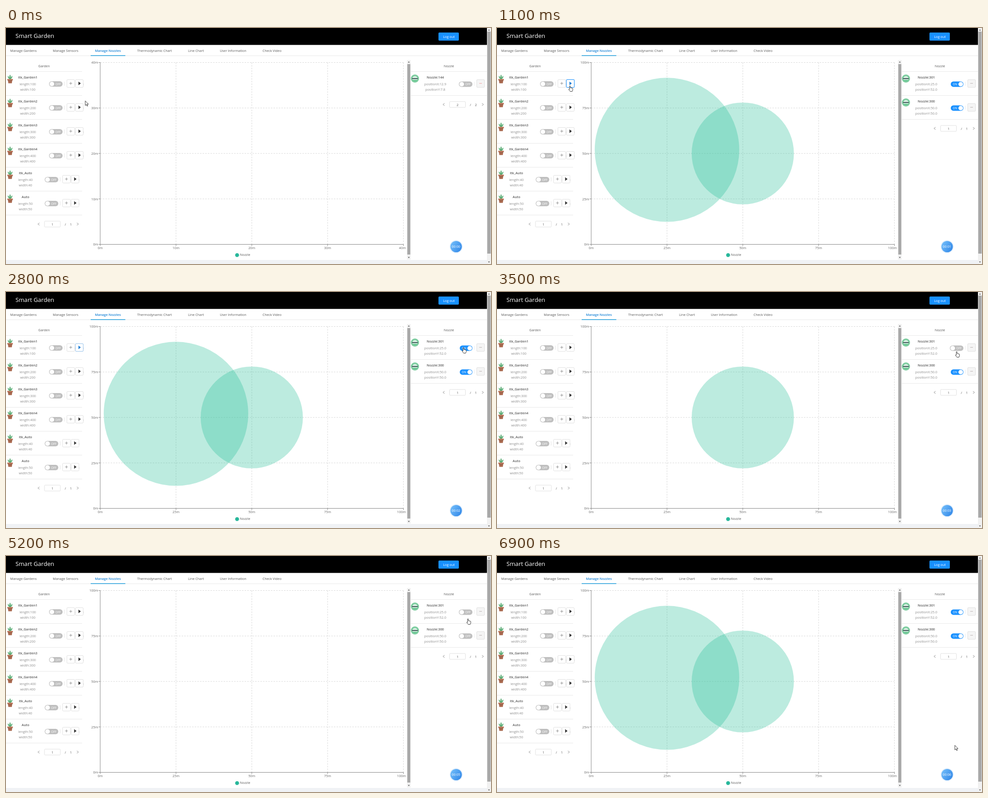
Animation of 1071 by 523 pixels, one loop 7 s. Source, as an HTML page:

```html
<!DOCTYPE html>
<html lang="en">
<head>
<meta charset="utf-8">
<title>Smart Garden</title>
<style>
html, body { margin: 0; width: 100%; height: 100%; overflow: hidden; background: #fff; }
svg { display: block; width: 1071px; height: 523px; font: 7.35px "Open Sans", "Noto Sans", sans-serif; }
</style>
</head>
<body>
<svg id="stage" viewBox="0 0 1071 523" xmlns="http://www.w3.org/2000/svg">
  <defs>
    <linearGradient id="blue" x1="0" y1="0.2" x2="1" y2="0.8">
      <stop offset="0" stop-color="#72bdfa"/><stop offset="1" stop-color="#3288e8"/>
    </linearGradient>
  </defs>
  <g id="page"></g>
  <g id="live"></g>
</svg>
<script>
const LOOP = 7000, STEP = 100;
const LOADED = 700;
const GREEN = '#23bc94', BLUE = '#1890ff', LINE = '#e8e8e8', EDGE = '#d9d9d9';
const page = document.getElementById('page');
const live = document.getElementById('live');

const clamp = v => Math.max(0, Math.min(1, v));
const lerp = (a, b, k) => a + (b - a) * k;
const ramp = (t, start, span) => clamp((t - start) / span);

const rect = (x, y, w, h, fill, more = '') =>
  `<rect x="${x}" y="${y}" width="${w}" height="${h}" fill="${fill}" ${more}/>`;
const disc = (x, y, r, fill, more = '') =>
  `<circle cx="${x}" cy="${y}" r="${r}" fill="${fill}" ${more}/>`;
const path = (d, more) => `<path d="${d}" ${more}/>`;
const stroke = (d, color, w = 1, more = '') =>
  path(d, `fill="none" stroke="${color}" stroke-width="${w}" ${more}`);
const text = (s, x, y, fill = '#595959', anchor = 'middle', more = '') =>
  `<text x="${x}" y="${y}" fill="${fill}" text-anchor="${anchor}" ${more}>${s}</text>`;
const BOLD = 'font-weight="600"';

function box(x, y, w, h, fill = '#fff', edge = EDGE) {
  return rect(x + .5, y + .5, w - 1, h - 1, fill, `rx="1.5" stroke="${edge}" stroke-width=".8"`);
}

// k = 0 is off, 1 is on; the right edge stays fixed
function toggle(right, cy, k) {
  const w = lerp(30, 28, k), x = right - w;
  const mix = [[191, 24], [191, 144], [191, 255]].map(c => Math.round(lerp(...c, k)));
  const label = k < .5 ? text('OFF', x + 20, cy + 2.6, '#fff', 'middle', 'font-size="6.4"')
                       : text('ON', x + 9.5, cy + 2.6, '#fff', 'middle', 'font-size="6.4"');
  return rect(x, cy - 6, w, 12, `rgb(${mix})`, 'rx="6"') +
    disc(lerp(x + 6.3, right - 6, k), cy, 5.1, '#fff') + label;
}

function pager(left, cy, now, total) {
  return stroke(`M${left + 2} ${cy - 2.7}l-3.6 2.7 3.6 2.7M${left + 84.5} ${cy - 2.7}l3.6 2.7-3.6 2.7`, '#777', .8) +
    box(left + 12.5, cy - 7, 36, 14) +
    text(now, left + 30.5, cy + 3) + text('/', left + 59, cy + 3) + text(total, left + 71, cy + 3);
}

function plant(x, y) {
  return path(`M${x} ${y + 10}C${x - 6} ${y + 7} ${x - 5} ${y + 3} ${x - 5} ${y + 2}Q${x - 2} ${y + 4} ${x - 1.6} ${y + 6}` +
      `Q${x - 2} ${y + 2} ${x} ${y - 1}Q${x + 2} ${y + 2} ${x + 1.6} ${y + 6}Q${x + 2} ${y + 4} ${x + 5} ${y + 2}` +
      `C${x + 5} ${y + 3} ${x + 6} ${y + 7} ${x} ${y + 10}z`, 'fill="#62b37c"') +
    stroke(`M${x} ${y + 1}V${y + 9}`, '#3f8f5e', .7) +
    path(`M${x - 5} ${y + 11}h10l-1.2 7.5h-7.6z`, 'fill="#a9694f"') +
    rect(x - 6.2, y + 9, 12.4, 3, '#bb7a5f', 'rx=".5"') +
    rect(x - 4.7, y + 12, 9.4, .8, '#85503c');
}

function gardenRow(name, size, i) {
  const y = 96 + 53 * i, dx = i > 3 ? -9.5 : 0, cx = i > 3 ? 43 : 48;
  return plant(9, y + 8) + text(name, cx, y + 16, '#595959', 'middle', BOLD) +
    text('length:' + size, cx, y + 30.5, '#8c8c8c') + text('width:' + size, cx, y + 42.7, '#8c8c8c') +
    toggle(125 + dx, y + 28, 0) +
    stroke(`M${129 + dx} ${y + 23}v9M${152.8 + dx} ${y + 27}v4M${171.3 + dx} ${y + 27}v4`, '#ddd', .8) +
    box(134 + dx, y + 18, 18, 18) +
    stroke(`M${139.8 + dx} ${y + 26.7}h6.4m-3.2-3.2v6.4`, '#777', .8) +
    playButton(153 + dx, y + 18, EDGE, '#333') +
    stroke(`M0 ${y + 53.5}H168`, LINE);
}

function playButton(x, y, edge, ink) {
  return box(x, y, 18, 18, '#fff', edge) + path(`M${x + 7} ${y + 4.8}l5.2 4-5.2 4z`, `fill="${ink}"`);
}

function scrollbar(x, w, top, bottom, from, to) {
  const c = x + w / 2;
  return rect(x, top, w, bottom - top, '#f1f1f1') + rect(x + .7, from, w - 1.4, to - from, '#a8a8a8') +
    path(`M${c - 2} ${top + 5.5}h4l-2-2.4zM${c - 2} ${bottom - 5.5}h4l-2 2.4z`, 'fill="#555"');
}

function drawPage() {
  const tabs = [['Manage Gardens', 38.5], ['Manage Sensors', 131.5], ['Manage Nozzles', 225],
    ['Thermodynamic Chart', 328], ['Line Chart', 419.5], ['User Information', 501.5], ['Check Video', 587.5]];
  const gardens = [['itk_Garden1', 100], ['itk_Garden2', 200], ['itk_Garden3', 300],
    ['itk_Garden4', 400], ['itk_Auto', 40], ['Auto', 50]];
  let s = rect(0, 0, 1071, 523, '#fff') + rect(0, 514, 1062, 9, '#f0f2f5') + rect(0, 0, 1062, 37.5, '#000');
  s += text('Smart Garden', 21, 21.5, '#fff', 'start', 'font-size="13.1"');
  s += rect(955, 10, 45, 18, BLUE, 'rx="2"') + text('Log out', 978, 21.7, '#fff');
  s += stroke('M0 61.5H1062', LINE);
  tabs.forEach(([name, x], i) => {
    s += i === 2 ? text(name, x, 53, '#1b84d6', 'middle', BOLD) : text(name, x, 53);
  });
  s += rect(187, 60.5, 76.5, 1.5, '#1b9ad8');
  s += text('Garden', 84, 86.5) + text('Nozzle', 978, 86.5);
  s += stroke('M0 96.5H168M894 96.5H1062M894 149.5H1062', LINE);
  gardens.forEach(([name, size], i) => { s += gardenRow(name, size, i); });
  s += pager(72, 434.5, 1, 1);

  let grid = '', ticks = 'M208 76V479.5H878';
  for (let i = 0; i < 5; i++) {
    const x = 208 + i * 167.4, y = 76.5 + i * 100.75;
    if (i < 4) grid += `M208 ${y}H877.5`;
    if (i) grid += `M${x} 76.5V479.5`;
    ticks += `M204.5 ${y}h3.5M${x} 479.5v3.5`;
  }
  s += stroke(grid, '#ccc', .8, 'stroke-dasharray="3.2 2.6"') + stroke(ticks, '#777', .9);
  s += disc(510.3, 503.3, 4.3, '#28b79b') + text('Nozzle', 516.5, 505.3, '#595959', 'start');
  s += scrollbar(885.5, 8, 71, 513, 80, 502) + scrollbar(1062, 9, 0, 523, 8, 500);
  s += disc(994, 484.5, 14.6, '#e6f1fc') + disc(994, 484.5, 12.6, 'url(#blue)');
  page.innerHTML = s;
}

function nozzleRow(i, id, px, py, k, minus) {
  const y = 96 + 53 * i;
  return disc(903, y + 16, 9, '#6fc796') +
    disc(903, y + 16, 7.6, 'none', 'stroke="#a5dfbd" stroke-width=".6"') +
    path(`M897.5 ${y + 15}q1-4.5 5.5-4.5t5.5 4.5z`, 'fill="#d8efe2"') +
    rect(896.5, y + 15, 13, 2.3, '#40585a', 'rx=".6"') + rect(897.5, y + 17.3, 11, 1.4, '#f3faf6') +
    text('Nozzle:' + id, 948, y + 16, '#595959', 'middle', BOLD) +
    text('positionX:' + px, 948, y + 30.5, '#8c8c8c') + text('positionY:' + py, 948, y + 42.7, '#8c8c8c') +
    toggle(1030, y + 28.5, k) + stroke(`M1034.7 ${y + 23}v9`, LINE, .8) +
    box(1039, y + 18, 18, 18, '#f5f5f5') + stroke(`M1045 ${y + 26.7}h6`, minus, .8) +
    stroke(`M894 ${y + 53.5}H1062`, LINE);
}

function axisLabels(max) {
  let s = '';
  for (let i = 0; i < 5; i++) {
    const label = max / 4 * i + 'm';
    s += text(label, 203.5, 482.3 - i * 100.75, '#666', 'end');
    s += i < 4 ? text(label, 208 + i * 167.4, 489.5, '#666') : text(label, 883, 489.5, '#666', 'end');
  }
  return s;
}

// Bubble areas are in square pixels and change linearly
const SMALL = 40000, LARGE = 80000;
const bubble = (mx, my, area) =>
  area > 0 ? disc(208 + mx * 6.695, 479.5 - my * 4.03, Math.sqrt(area / Math.PI), GREEN, 'fill-opacity=".3"') : '';

function bubbles(t) {
  if (t < LOADED) return '';
  if (t < 2800) {
    const k = ramp(t, LOADED, 400);
    return bubble(25, 52, LARGE * k) + bubble(50, 50, SMALL * k);
  }
  if (t < 4300) {
    const k = ramp(t, 2800, 400);
    return k ? bubble(lerp(25, 50, k), lerp(52, 50, k), lerp(LARGE, SMALL, k))
             : bubble(25, 52, LARGE) + bubble(50, 50, SMALL);
  }
  const a = ramp(t, 5300, 400), b = ramp(t, 6200, 400);
  return bubble(25, 52, SMALL * a + (LARGE - SMALL) * b) + bubble(50, 50, SMALL * b);
}

// time, x, y
const TRAIL = [
  [0, 175, 161.5], [500, 163, 134], [1600, 163, 134], [2000, 560, 142], [2400, 1020, 128], [2600, 1012, 129],
  [2900, 1012, 129], [3500, 1017, 138], [3800, 1017, 140], [4200, 1017, 181], [4400, 1017, 181],
  [4800, 1022, 145], [5200, 1022, 145], [5300, 1018, 129], [5400, 1018, 129], [5700, 1019, 194],
  [5800, 1018, 185], [6300, 1018, 185], [6500, 1031, 270], [6600, 1033, 350], [6700, 1019, 403],
  [6800, 1013, 416], [6900, 1011, 419.5], [7000, 1011, 419.5]
];

function cursor(t) {
  const i = TRAIL.findIndex(p => p[0] > t);
  const [t0, x0, y0] = TRAIL[i - 1], [t1, x1, y1] = TRAIL[i];
  const k = (t - t0) / (t1 - t0);
  const x = lerp(x0, x1, k), y = lerp(y0, y1, k);
  const hand = (t >= 400 && t < 1700) || (t >= 2400 && t < 6400);
  const d = hand
    ? 'M-2.8 1V-5.2q.9-1.6 1.9 0V-1.6l3.9.8q1.3.3 1.3 1.6v2.5L3.1 6.5h-4.6l-3.2-4.3q.2-1.5 1.9-.2z'
    : 'M0 0V10.2l2.4-2.2 1.7 3.7 1.5-.7-1.6-3.6h3.2z';
  return path(d, `transform="translate(${x} ${y})" fill="#fff" stroke="#222" stroke-width=".9" stroke-linejoin="round"`);
}

function draw(t) {
  const loaded = t >= LOADED;
  let s = axisLabels(loaded ? 100 : 40) + bubbles(t);
  if (t >= 400 && t < 2900) {
    const glow = t >= 600 ? 1 - ramp(t, 600, 1800) : 0;
    s += playButton(153, 114, t < 1800 ? BLUE : '#7cb5ea', '#1b7fd6');
    s += rect(152.7, 113.7, 18.6, 18.6, 'none', `rx="2" stroke="${BLUE}" stroke-opacity="${glow * .5}"`);
  }
  if (loaded) {
    const first = 1 - ramp(t, 2800, 300) + ramp(t, 5300, 300);
    const second = 1 - ramp(t, 4200, 300) + ramp(t, 6200, 300);
    s += nozzleRow(0, 301, '25.0', '52.0', first, '#a89c9c') +
      nozzleRow(1, 300, '50.0', '50.0', second, '#a89c9c') + pager(966.5, 222.5, 1, 1);
  } else {
    s += nozzleRow(0, 144, '12.9', '7.8', 0, '#f08a8a') + pager(966.5, 169.5, 2, 2);
  }
  s += text('00:0' + Math.floor(t / 1000), 993.7, 487.2, '#fff');
  live.innerHTML = s + cursor(t);
}

drawPage();
const begin = performance.now();
let last = -1;
function tick() {
  const t = Math.floor((performance.now() - begin) % LOOP / STEP) * STEP;
  if (t !== last) draw(last = t);
  requestAnimationFrame(tick);
}
tick();
</script>
</body>
</html>
```
